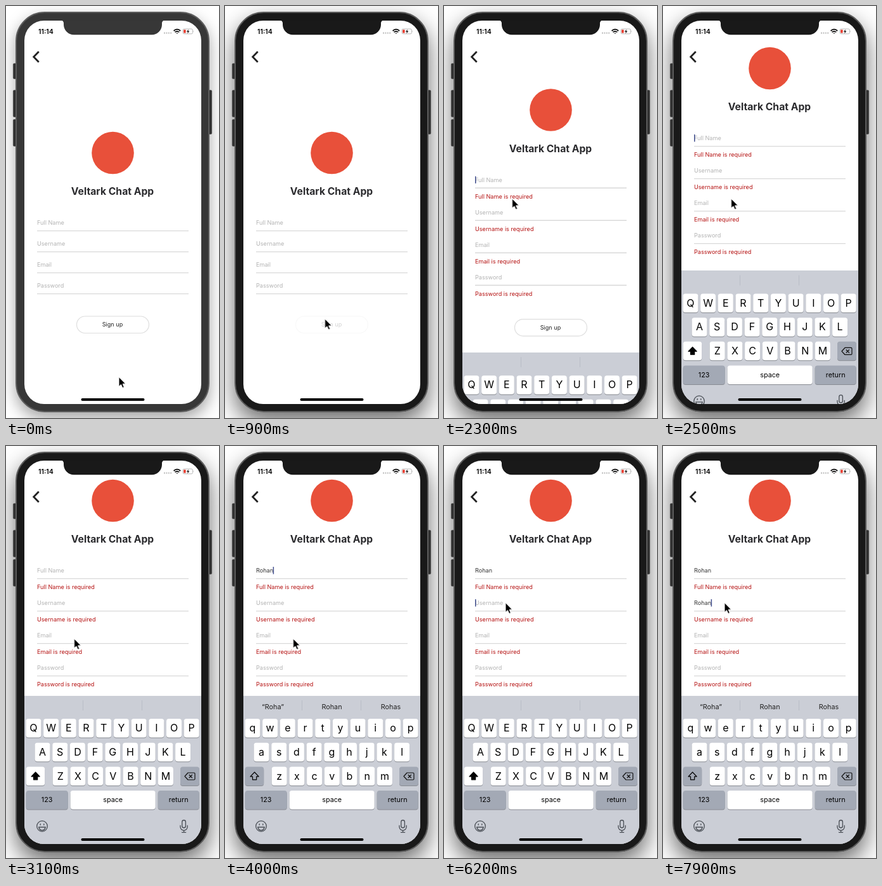
Recreate the animation shown at these times as an HTML page. Size 336 by 648 pixels, loop 8 s.

```html
<!DOCTYPE html>
<html lang="en">
<head>
<meta charset="utf-8">
<title>Sign-up form</title>
<style>
  html, body { margin: 0; width: 100%; height: 100%; overflow: hidden; background: #fff; }
  .stage { position: relative; width: 336px; height: 648px; overflow: hidden; }
  svg { position: absolute; inset: 0; }
  text { font-family: Inter, Roboto, sans-serif; white-space: pre; }
  .mid { text-anchor: middle; }
  .small { font-size: 9.15px; }

  .shadow {
    position: absolute; left: 15px; top: 9px; width: 306px; height: 630px; border-radius: 46px;
    animation: shadow 8s step-end infinite;
  }
  .shell { animation: shell 8s step-end infinite; }
  .form { animation: lift 8s linear infinite; }
  .spread { animation: spread 8s step-end infinite; }
  .error { fill: #b51212; animation: appear 8s step-end infinite; }
  .button { animation: press 8s linear infinite; }
  .keyboard { animation: keyboard 8s linear infinite; }
  .pointer { animation: pointer 8s ease-in-out infinite; }

  @keyframes shadow {
    0% { box-shadow: 0 10px 24px rgba(0, 0, 0, .36); }
    7%, 100% { box-shadow: 0 16px 36px rgba(0, 0, 0, .58); }
  }
  @keyframes shell {
    0% { fill: #373737; }
    7%, 100% { fill: #191919; }
  }
  @keyframes spread {
    0% { transform: none; }
    13.75%, 100% { transform: translateY(calc(var(--i) * 18px)); }
  }
  @keyframes appear {
    0% { opacity: 0; }
    13.75%, 100% { opacity: 1; }
  }
  @keyframes press {
    0%, 10.1% { opacity: 1; }
    11.2%, 13.75% { opacity: .2; }
    16.25%, 100% { opacity: 1; }
  }
  @keyframes lift {
    0% { transform: none; animation-timing-function: step-end; }
    13.75%, 27.5% { transform: translateY(-36px); }
    28.75% { transform: translateY(-67px); animation-timing-function: ease-out; }
    32.5%, 100% { transform: translateY(-145px); }
  }
  @keyframes keyboard {
    0%, 27.5% { transform: translateY(233px); }
    28.75% { transform: translateY(153px); animation-timing-function: ease-out; }
    32.5%, 100% { transform: none; }
  }
  @keyframes pointer {
    0%, 1% { transform: translate(178px, 583.5px); }
    6.5%, 18.5% { transform: translate(157.5px, 492px); }
    25.5%, 63.75% { transform: translate(107.5px, 303px); }
    72.5%, 100% { transform: translate(97px, 246.5px); }
  }
</style>
</head>
<body>
<div class="stage">
  <div class="shadow"></div>
  <svg width="336" height="648" viewBox="0 0 336 648">
    <defs>
      <clipPath id="screen"><rect x="29" y="23" width="279" height="603" rx="31"/></clipPath>
    </defs>

    <g fill="#303030" stroke="#4d4d4d" stroke-width=".8">
      <rect x="11.4" y="90.4" width="6" height="24" rx="1.5"/>
      <rect x="11.4" y="132.4" width="6" height="42" rx="1.5"/>
      <rect x="11.4" y="178.4" width="6" height="42" rx="1.5"/>
      <rect x="318.6" y="132.4" width="6" height="69" rx="1.5"/>
    </g>
    <rect class="shell" x="16" y="10" width="304" height="628" rx="45" stroke="#5c5c5c" stroke-width="2"/>
    <rect x="29" y="23" width="279" height="603" rx="31" fill="#fff"/>

    <g clip-path="url(#screen)">
      <g class="form" id="form">
        <circle cx="168.5" cy="231" r="33.3" fill="#e8503a"/>
        <text class="mid" x="168" y="297.3" font-size="15.7" font-weight="700" fill="#2b2b2e">Veltark Chat App</text>
        <g class="spread" style="--i:4">
          <g class="button">
            <rect x="111.5" y="488" width="114" height="26.5" rx="13.2" fill="#fff" stroke="#dedede" stroke-width="1.2"/>
            <text class="mid small" x="168" y="504.3" fill="#222">Sign up</text>
          </g>
        </g>
      </g>

      <g class="keyboard" id="keyboard">
        <rect x="29" y="393" width="279" height="234" fill="#cbced6"/>
        <path d="M121.5 400v16M214.5 400v16" stroke="#b9bdc6"/>
        <g fill="none" stroke="#484d54" stroke-width="1.3" stroke-linecap="round">
          <circle cx="57" cy="598" r="8.3"/>
          <path d="M51.8 599.5h10.4q-1 5-5.2 5t-5.2-5zM54.2 594.3v1.7M59.8 594.3v1.7"/>
          <rect x="277.8" y="588.5" width="5.6" height="12" rx="2.8"/>
          <path d="M275 597v2a5.6 5.6 0 0 0 11.2 0v-2M280.6 604.6v3M277.5 607.6h6.2"/>
        </g>
      </g>
    </g>

    <path class="shell" d="M85 22.5H86.5A4.5 4.5 0 0 1 91 27V29.3A16 16 0 0 0 107 45.3H230A16 16 0 0 0 246 29.3V27A4.5 4.5 0 0 1 250.5 22.5Z"/>
    <text x="51" y="43.6" font-size="10.5" font-weight="600">11:14</text>
    <path d="M249 42.5h13" stroke="#bbb" stroke-width="2" stroke-dasharray="2 1.4"/>
    <g fill="none" stroke="#000" stroke-width="1.7">
      <path d="M264.6 39q5.3-4.6 10.6 0M266.5 41.2q3.4-2.8 6.8 0"/>
      <path d="M268.5 42.4h2.8l-1.4 1.5z" fill="#000" stroke="none"/>
    </g>
    <rect x="279" y="36" width="15.5" height="7.8" rx="2.2" fill="#fff" stroke="#aaa" stroke-width=".8"/>
    <rect x="280.2" y="37.2" width="3.4" height="5.4" rx="1" fill="#e8392c"/>
    <path d="M295.6 38.5q1.4 1.4 0 2.8z" fill="#aaa"/>
    <path d="M288 36.7l-3.2 3.8h2.2l-.9 2.9 3.3-3.9h-2.2z"/>
    <path d="M51.7 71.8l-8 8.2 8 8.2" fill="none" stroke="#222" stroke-width="2.8"/>
    <rect x="118.5" y="617" width="100" height="4" rx="2"/>

    <path class="pointer" d="M0 0V15L3.5 11.9L5.8 17.2L8.4 16.1L6.1 10.9H10.8Z" stroke="#fff" stroke-width="1"/>
  </svg>
</div>

<script>
const LOOP = 8000, KEY_GAP = 150, SUGGEST_LAG = 100;
const NAME = 'Rohan';
const SESSIONS = [{ focus: 2150, first: 3350 }, { focus: 5950, first: 7250 }];
const SUGGESTIONS = [
  ['', '', ''], ['“R”', 'Right', 'Really'], ['“Ro”', 'Room', 'Road'],
  ['“Roh”', 'Roh', 'Rob'], ['“Roha”', 'Rohan', 'Rohas'], ['“Rohan”', 'Rohan', 'Rohans']
];

const form = document.getElementById('form');
const keyboard = document.getElementById('keyboard');

function add(parent, tag, attrs, content = '') {
  const el = document.createElementNS('http://www.w3.org/2000/svg', tag);
  for (const key in attrs) el.setAttribute(key, attrs[key]);
  el.textContent = content;
  return parent.appendChild(el);
}

const fields = ['Full Name', 'Username', 'Email', 'Password'].map((label, i) => {
  const y = 341 + 33 * i;
  const group = add(form, 'g', { class: 'spread', style: `--i:${i}` });
  add(group, 'path', { d: `M49 ${y + 12.7}h239`, stroke: '#d9d9d9', 'stroke-width': 1.3 });
  add(group, 'text', { class: 'small error', x: 49, y: y + 29.4 }, label + ' is required');
  return {
    label,
    text: add(group, 'text', { class: 'small', x: 49, y: y + 3.3 }),
    caret: add(group, 'rect', { y: y - 6, width: 1.5, height: 11.5, fill: '#43508f' })
  };
});

function addKey(x, row, width, fill, label = '', size = 10.8) {
  const y = 429 + 37.7 * row;
  add(keyboard, 'rect', { x, y: y + 1, width, height: 29.5, rx: 4, fill: '#898c93' });
  const face = add(keyboard, 'rect', { x, y, width, height: 29.5, rx: 4, fill });
  const text = add(keyboard, 'text',
    { class: 'mid', x: x + width / 2, y: y + 14.4 + size * 0.36, 'font-size': size, fill: '#000' }, label);
  return { face, text };
}

const GRAY = '#a3a9b5';
const letters = [['qwertyuiop', 43.4], ['asdfghjkl', 57.5], ['zxcvbnm', 85.7]].flatMap(([keys, start], row) =>
  [...keys].map((char, i) => ({ char, el: addKey(start + 27.7 * i - 12, row, 24, '#fff', char, 16).text })));

const shift = addKey(31.7, 2, 29.5, '#fff').face;
const arrow = add(keyboard, 'path', {
  d: 'M46.6 513l-6.6 6.8h3.5v5h6.2v-5h3.5z', stroke: '#000', 'stroke-width': 1.2, 'stroke-linejoin': 'round'
});
addKey(275, 2, 30, GRAY);
add(keyboard, 'path', {
  d: 'M287 514h9.5q1.5 0 1.5 1.5v8q0 1.5-1.5 1.5h-9.5l-5-5.5zM288.8 517l5 5M293.8 517l-5 5',
  fill: 'none', stroke: '#111', 'stroke-width': 1.2, 'stroke-linejoin': 'round'
});
addKey(31.7, 3, 66, GRAY, '123');
addKey(101.7, 3, 134, '#fff', 'space');
addKey(239.7, 3, 65, GRAY, 'return');

const hints = [75.5, 168.5, 261.5].map(x =>
  add(keyboard, 'text', { class: 'mid', x, y: 414.3, 'font-size': 10.8, fill: '#222' }));

const typedAt = (session, t) =>
  Math.max(0, Math.min(NAME.length, Math.floor((t - session.first) / KEY_GAP) + 1));

function render(t) {
  const active = SESSIONS.findLastIndex(s => t >= s.focus);
  const session = SESSIONS[active];
  const typed = session ? typedAt(session, t) : 0;
  const lastAction = typed ? session.first + KEY_GAP * (typed - 1) : session?.focus;

  fields.forEach(({ label, text, caret }, i) => {
    const value = SESSIONS[i] ? NAME.slice(0, typedAt(SESSIONS[i], t)) : '';
    text.textContent = value || label;
    text.setAttribute('fill', value ? '#333' : '#b3b3b3');
    const visible = i === active && (t - lastAction) % 1000 < 500;
    caret.setAttribute('opacity', visible ? 1 : 0);
    caret.setAttribute('x', value ? 48.5 + text.getComputedTextLength() : 49);
  });

  const lower = typed > 0;
  for (const { char, el } of letters) el.textContent = lower ? char : char.toUpperCase();
  shift.setAttribute('fill', lower ? GRAY : '#fff');
  arrow.setAttribute('fill', lower ? 'none' : '#000');
  const words = SUGGESTIONS[session ? typedAt(session, t - SUGGEST_LAG) : 0];
  hints.forEach((hint, i) => { hint.textContent = words[i]; });
}

let start;
function tick(now) {
  start ??= now;
  render((now - start) % LOOP);
  requestAnimationFrame(tick);
}
render(0);
requestAnimationFrame(tick);
</script>
</body>
</html>
```
